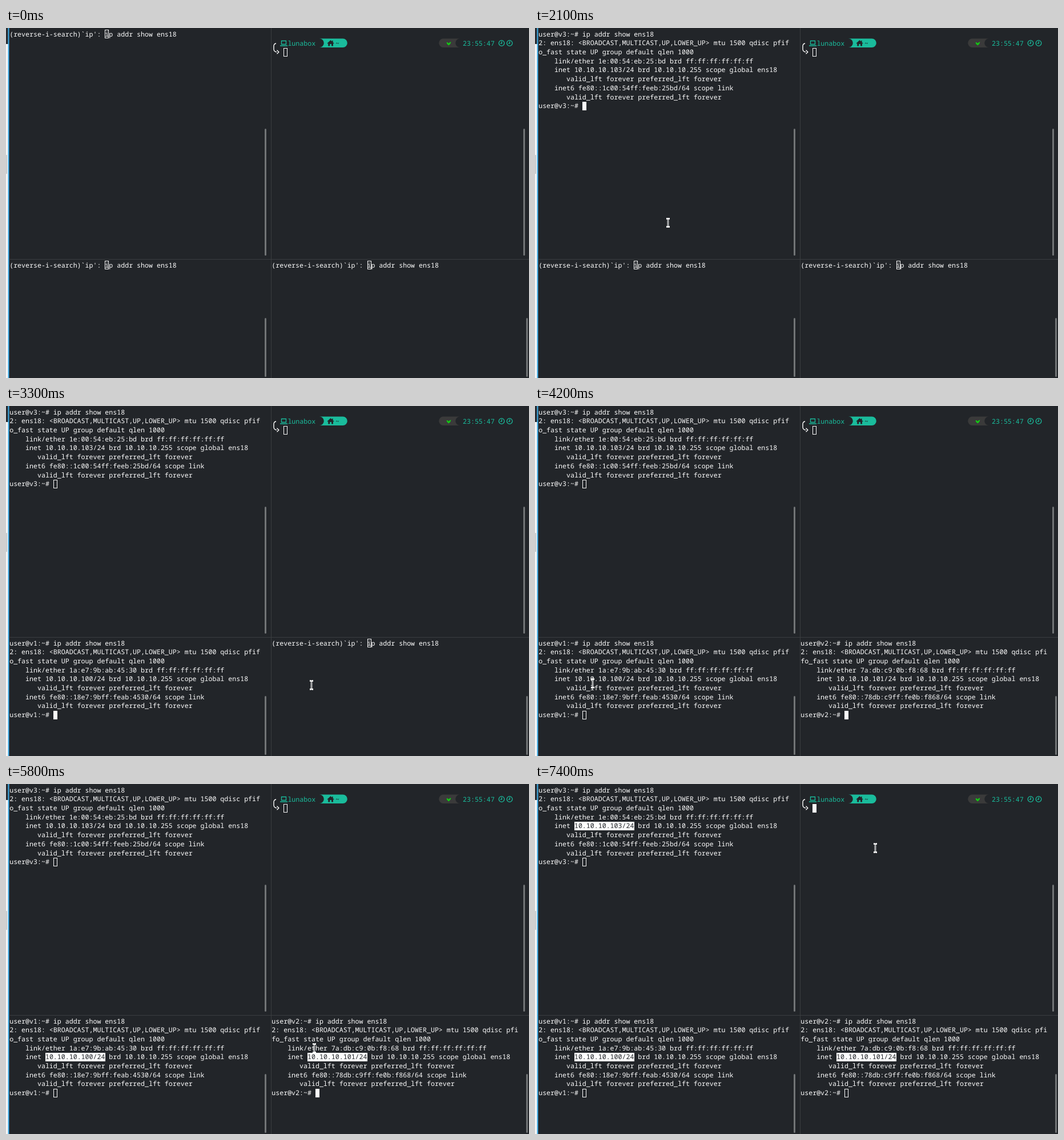
Write an HTML page that moves like this. It is 916 px wide and 612 px high and loops after 8000 ms.

```html
<!DOCTYPE html>
<html lang="en">
<head>
<meta charset="utf-8">
<title>Terminal panes</title>
<style>
html, body { margin: 0; width: 100%; height: 100%; overflow: hidden; background: #222529; }
svg { display: block; width: 916px; height: 612px; }
text {
  font: 500 11.62px "Noto Sans Mono", "DejaVu Sans Mono", monospace;
  white-space: pre;
  text-rendering: geometricPrecision;
}
</style>
</head>
<body>
<svg viewBox="0 0 916 612">
  <rect width="916" height="612" fill="#222529"/>
  <rect width="4" height="612" fill="#f4f5f6"/>
  <rect width="4" height="28" fill="#2a2e33"/>
  <rect y="222" width="2" height="33" fill="#c9cbcd"/>
  <rect x="3.5" width="2" height="612" fill="#3daee9"/>
  <path d="M464.5 0V612M5.5 404.5H916" stroke="#3a3d40" fill="none"/>
  <g fill="#717476">
    <rect x="453" y="176" width="3" height="222" rx="1.5"/>
    <rect x="453" y="507" width="3" height="103" rx="1.5"/>
    <rect x="906" y="176" width="3" height="222" rx="1.5"/>
    <rect x="911" y="507" width="3" height="103" rx="1.5"/>
  </g>

  <g fill="#1abc9c">
    <path d="M482.5 22.5H490.5V28.5H482.5ZM480 31H493" fill="none" stroke="#1abc9c" stroke-width="1.3"/>
    <text x="493.4" y="30.5">lunabox</text>
    <path d="M549 18.5H590a7.8 7.8 0 0 1 0 15.6H549a7.8 7.8 0 0 0 0 -15.6Z"/>
    <text x="800" y="30.5">23:55:47</text>
  </g>
  <path d="M562.5 26.8L568.5 21.3 571 23.6V22H572.6V25L574.8 26.8 574 27.6 573 26.8V31.5H570V28H567.3V31.5H564.2V26.8L563.3 27.6Z" fill="#222529"/>
  <text x="577" y="30.5" fill="#222529">~</text>
  <path d="M473 27Q469 27.5 469 32V36.5Q469 41.5 474 42M474.5 38.8L477.8 42 474.5 45.2" fill="none" stroke="#fcfcfc" stroke-width="1.4"/>
  <path d="M766 18.5H795a7.8 7.8 0 0 0 0 15.6H766a7.8 7.8 0 0 1 0 -15.6Z" fill="#3a3a3a"/>
  <path d="M771.5 25.2Q774 24.6 775.3 27 777 24.4 779.5 24.6 778.8 28.5 775.3 30.5 772 28.5 771.5 25.2Z" fill="#14c914"/>
  <g fill="none" stroke="#1abc9c" stroke-width="1.3">
    <circle cx="868" cy="26.5" r="4.8"/>
    <circle cx="882" cy="26.5" r="4.8"/>
    <path d="M868.3 23.2V26.8H865.6M882.3 23.2V26.8H879.6"/>
  </g>

  <g id="panes"></g>
  <g id="mouse" fill="none">
    <path id="beam" d="M-3 -7.2H-1.2L0 -6.2 1.2 -7.2H3M0 -6.2V6.2M-3 7.2H-1.2L0 6.2 1.2 7.2H3" stroke="#fcfcfc" stroke-width="2.4"/>
    <use href="#beam"/>
    <path d="M0 -6V6" stroke="#222529" stroke-width="0.8"/>
  </g>
</svg>
<script>
const LOOP = 8000, TICK = 100;
const CW = 6.97, LH = 15.7;
const FG = '#fcfcfc', BG = '#222529';
const CMD = 'ip addr show ens18';

// run: Enter pressed, wait: cursor drops a line, done: output printed, pick: address selected
const panes = [
  { id: 'top', x: 6.2, y: 0, cols: 63, host: 'user@v3', run: 1600, wait: 1700, done: 1800, pick: 6900,
    mac: '1e:00:54:eb:25:bd', ip: '10.10.10.103/24', ip6: 'fe80::1c00:54ff:feeb:25bd/64' },
  { id: 'left', x: 6.2, y: 403.9, cols: 63, host: 'user@v1', run: 2900, wait: 2900, done: 3000, pick: 4700,
    mac: '1a:e7:9b:ab:45:30', ip: '10.10.10.100/24', ip6: 'fe80::18e7:9bff:feab:4530/64' },
  { id: 'right', x: 465.3, y: 403.9, cols: 62, host: 'user@v2', run: 3500, wait: 3500, done: 3600, pick: 5700,
    mac: '7a:db:c9:0b:f8:68', ip: '10.10.10.101/24', ip6: 'fe80::78db:c9ff:fe0b:f868/64' }
];

const focus = [[0, ''], [1200, 'top'], [2700, 'left'], [3400, 'right'], [4400, 'left'],
  [5400, 'right'], [6600, 'top'], [7400, 'shell']];

// time, x, y of the pointer
const path = [
  [600, 202.5, 52], [700, 203, 95], [1900, 207, 150], [2100, 233, 340.5], [2300, 237, 370],
  [2500, 261, 504], [2800, 261, 504], [2900, 266.5, 506], [3000, 280, 505], [3300, 535, 488],
  [3700, 540, 482], [3800, 520, 476], [4100, 130, 480], [4200, 101, 485], [4500, 107, 485],
  [4700, 109, 487], [4800, 180, 490], [5000, 533, 478], [5100, 533, 478], [5200, 550, 482],
  [5500, 556, 480], [5700, 556, 477], [5800, 540, 462], [6000, 425, 335], [6200, 210, 140],
  [6300, 150, 85], [6400, 125, 69], [6900, 125, 69], [7000, 150, 74], [7200, 450, 102],
  [7300, 570, 110], [7400, 596, 112]
];

const $ = id => document.getElementById(id);
const esc = s => s.replace(/&/g, '&amp;').replace(/</g, '&lt;');
const last = (list, t) => list.filter(k => k[0] <= t).pop();

const label = (x, y, s, fill = FG) => `<text x="${x}" y="${y}" fill="${fill}">${esc(s)}</text>`;
const cell = (p, row, col, s, fill) =>
  label((p.x + col * CW).toFixed(2), (p.y + 14.6 + row * LH).toFixed(2), s, fill);

function block(x, y, w, solid) {
  const inset = solid ? 0 : 0.5;
  return `<rect x="${Math.round(x) + inset}" y="${Math.round(y) + inset}" width="${w - 2 * inset}"
    height="${15 - 2 * inset}" fill="${solid ? FG : 'none'}" stroke="${solid ? 'none' : FG}"/>`;
}

function cursor(p, row, col, solid, char = '') {
  const box = block(p.x + col * CW, p.y + 3.4 + row * LH, 7, solid);
  return box + (solid && char ? cell(p, row, col, char, BG) : '');
}

function output(p) {
  const head = '2: ens18: <BROADCAST,MULTICAST,UP,LOWER_UP> mtu 1500 qdisc pfifo_fast state UP group default qlen 1000';
  const life = '       valid_lft forever preferred_lft forever';
  return [
    head.slice(0, p.cols), head.slice(p.cols),
    `    link/ether ${p.mac} brd ff:ff:ff:ff:ff:ff`,
    `    inet ${p.ip} brd 10.10.10.255 scope global ens18`, life,
    `    inet6 ${p.ip6} scope link`, life,
    `${p.host}:~# `
  ];
}

function drawPane(p, t, solid) {
  if (t < p.run) {
    const search = "(reverse-i-search)`ip': ";
    return cell(p, 0, 0, search + CMD) + cursor(p, 0, search.length, solid, 'i');
  }
  const prompt = `${p.host}:~# `;
  const rows = [prompt + CMD];
  if (t >= p.done) rows.push(...output(p));
  let out = rows.map((s, i) => cell(p, i, 0, s)).join('');
  if (t < p.wait) out += cursor(p, 0, prompt.length, solid, 'i');
  else if (t < p.done) out += cursor(p, 1, 0, solid);
  else out += cursor(p, 8, prompt.length, solid);
  if (t >= p.pick) {
    out += block(p.x + 9 * CW, p.y + 3.4 + 4 * LH, 105, true) + cell(p, 4, 9, p.ip, BG);
  }
  return out;
}

function pointer(t) {
  if (t < 600 || (t >= 800 && t < 1900)) return null;
  const a = last(path, t), b = path[path.indexOf(a) + 1];
  if (!b) return a.slice(1);
  const k = (t - a[0]) / (b[0] - a[0]);
  return [a[1] + (b[1] - a[1]) * k, a[2] + (b[2] - a[2]) * k];
}

function draw(t) {
  const active = last(focus, t)[1];
  $('panes').innerHTML = panes.map(p => drawPane(p, t, active === p.id)).join('') +
    block(486, 35, 7, active === 'shell');
  const at = pointer(t);
  $('mouse').style.display = at ? '' : 'none';
  if (at) $('mouse').setAttribute('transform', `translate(${at[0].toFixed(1)} ${at[1].toFixed(1)})`);
}

let shown = -1;
const start = performance.now();
function loop() {
  const t = Math.floor((performance.now() - start) % LOOP / TICK) * TICK;
  if (t !== shown) draw(shown = t);
  requestAnimationFrame(loop);
}
loop();
</script>
</body>
</html>
```
